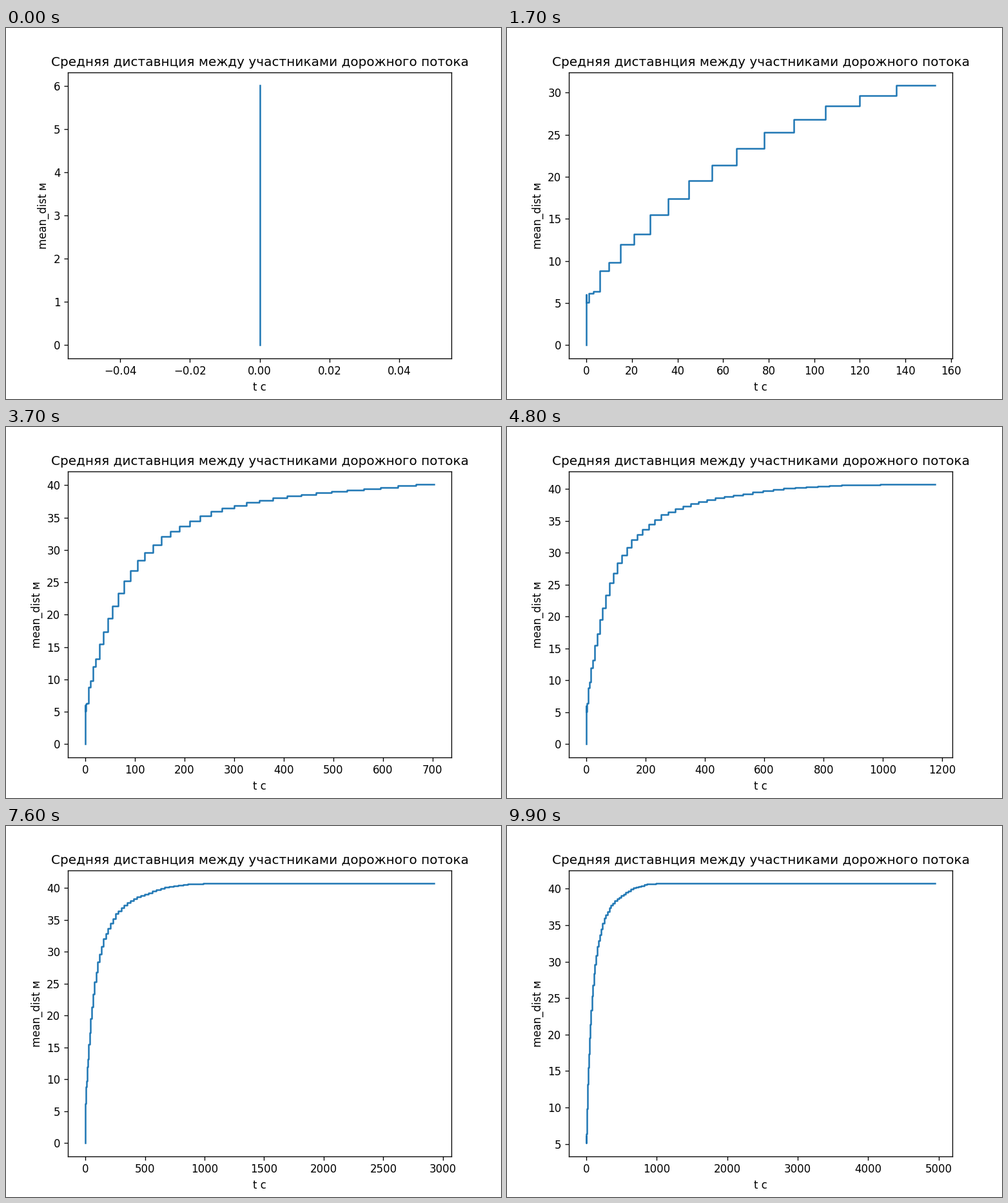
A matplotlib script that plays this animation: 768 px wide and 576 px high, repeating every 10000 ms.

```python
import numpy as np
import matplotlib.pyplot as plt
from matplotlib.animation import FuncAnimation

FRAMES = 100
WINDOW = 100  # number of latest samples kept on the plot

# Key points (step, metres) of the trend, flat after the last one
TREND = [
    (0, 5.415), (1, 5.685), (2, 5.64), (3, 6.83), (7, 13.35), (10, 19.463),
    (13, 25.25), (15, 28.4), (18, 32.05), (21, 34.5), (23, 35.95),
    (26, 37.36), (29, 38.36), (32, 39.06), (37, 40.12), (42, 40.63),
    (45, 40.715),
]


def mean_dist(k):
    """Trend plus an alternating wobble that dies out."""
    wobble = 0.6 * np.cos(np.pi * k) * np.exp(-(k / 6) ** 2)
    return np.interp(k, *zip(*TREND)) + wobble


step = np.arange(FRAMES)
times = np.r_[0, np.cumsum(step)]
dist = np.r_[0, mean_dist(step)]

plt.rcParams["font.family"] = "DejaVu Sans"
fig, ax = plt.subplots(figsize=(6.4, 4.8), dpi=120)


def draw(i):
    end = i + 2
    shown = slice(max(0, end - WINDOW), end)
    ax.clear()
    ax.step(times[shown], dist[shown], color="tab:blue")
    ax.set_title("Средняя диставнция между участниками дорожного потока")
    ax.set_xlabel("t c")
    ax.set_ylabel("mean_dist м")


anim = FuncAnimation(fig, draw, frames=FRAMES, interval=100,
                     init_func=lambda: draw(0), repeat=True, repeat_delay=0)
plt.show()
```
